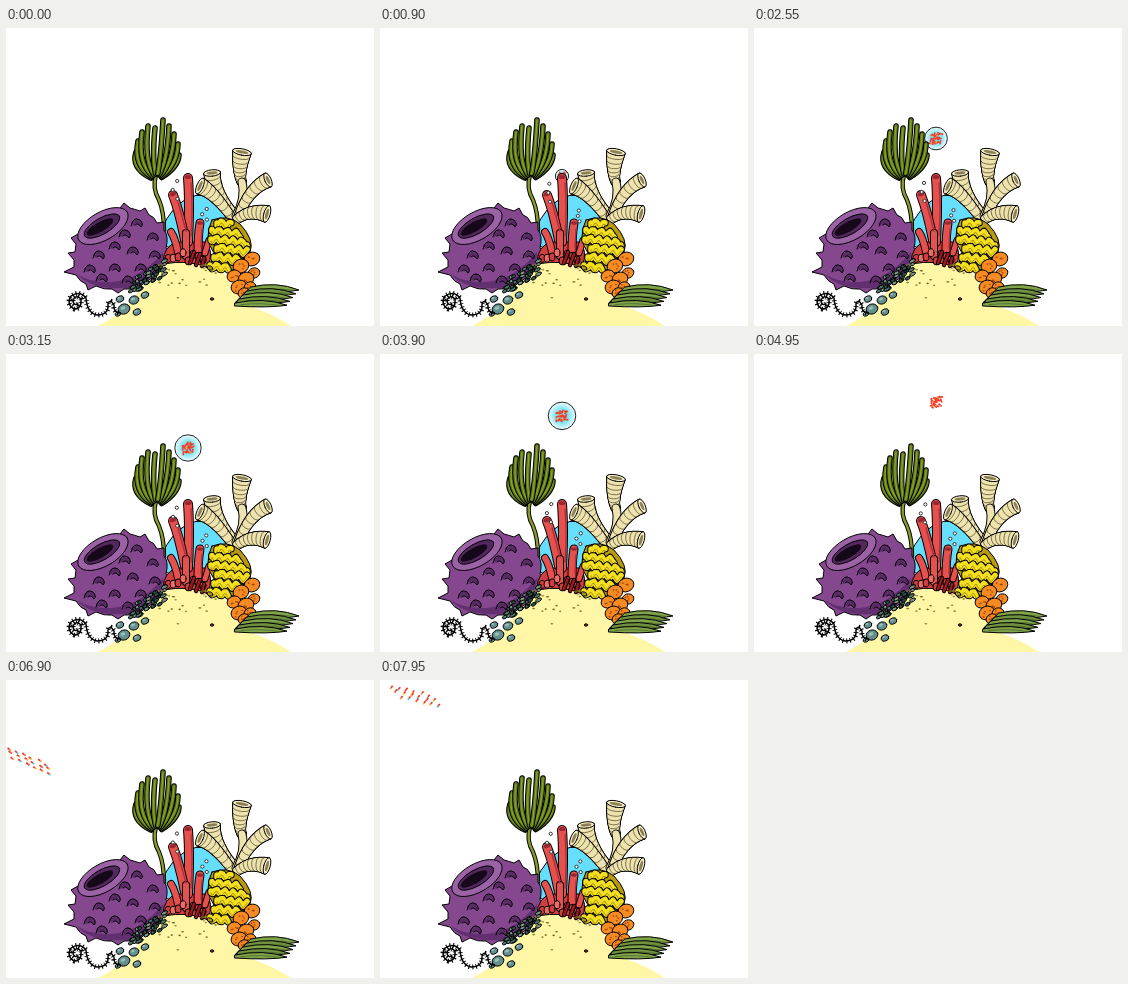
Recreate the animation shown at these times as an HTML page with a canvas. Size 368 by 298 pixels, loop 8000 ms.

```html
<!DOCTYPE html>
<html lang="en">
<head>
<meta charset="utf-8">
<title>Coral reef</title>
<style>
html, body { margin: 0; width: 100%; height: 100%; overflow: hidden; background: #fff; }
canvas { display: block; width: 368px; height: 298px; }
</style>
</head>
<body>
<canvas id="stage" width="368" height="298"></canvas>
<script>
const W = 368, H = 298, LOOP = 8000, STEP = 150, TAU = Math.PI * 2;
const ctx = document.getElementById('stage').getContext('2d');
const reef = document.createElement('canvas');
reef.width = W;
reef.height = H;
const g = reef.getContext('2d');
g.lineCap = g.lineJoin = 'round';

const rand = n => {
  const s = Math.sin(n * 127.1 + 11.7) * 43758.5453;
  return s - Math.floor(s);
};

function shape(d, fill, line = '#000', width = 1) {
  const p = new Path2D(d);
  if (fill) { g.fillStyle = fill; g.fill(p); }
  if (line) { g.strokeStyle = line; g.lineWidth = width; g.stroke(p); }
}

function oval(x, y, rx, ry, turn, fill, line = '#000') {
  g.beginPath();
  g.ellipse(x, y, rx, ry, turn * Math.PI / 180, 0, TAU);
  if (fill) { g.fillStyle = fill; g.fill(); }
  if (line) { g.strokeStyle = line; g.lineWidth = 1; g.stroke(); }
}

// outlined thick stroke
function rope(d, width, color) {
  shape(d, null, '#000', width + 2);
  shape(d, null, color, width);
}

// ribbed tube along a quadratic curve, wide at the mouth
function horn(x0, y0, cx, cy, x1, y1, r0, r1) {
  const at = u => [
    (1 - u) ** 2 * x0 + 2 * u * (1 - u) * cx + u * u * x1,
    (1 - u) ** 2 * y0 + 2 * u * (1 - u) * cy + u * u * y1
  ];
  const radius = u => r1 + (r0 - r1) * (1 - u) ** 1.4;
  const turn = u => Math.atan2((1 - u) * (cy - y0) + u * (y1 - cy), (1 - u) * (cx - x0) + u * (x1 - cx));
  for (const [grow, color] of [[1, '#000'], [0, '#eee3ae']]) {
    g.fillStyle = color;
    for (let u = 0; u <= 1; u += 0.015) {
      const [x, y] = at(u);
      g.beginPath();
      g.ellipse(x, y, 2 + grow, radius(u) + grow, turn(u), 0, TAU);
      g.fill();
    }
  }
  g.strokeStyle = '#5c5230';
  g.lineWidth = 0.8;
  for (let u = 0.13; u < 0.95; u += 0.13) {
    const [x, y] = at(u);
    g.beginPath();
    g.ellipse(x, y, 2, radius(u), turn(u), -Math.PI / 2, Math.PI / 2);
    g.stroke();
  }
  const deg = turn(0) * 180 / Math.PI;
  oval(x0, y0, 3.2, r0 + 0.5, deg, '#f8f0c4');
  oval(x0, y0, 1.5, r0 - 2.5, deg, '#8c8058', null);
}

function sand() {
  shape('M92 298 Q112 288 126 273 Q148 240 170 232 Q195 226 215 240 Q230 262 240 277 Q268 286 285 298Z', '#fff7a6', null);
}

function water() {
  shape('M156 200 Q165 180 180 171 Q200 160 220 179 L226 190 L206 216 L170 222 L154 216Z', '#66dfff');
}

function weed() {
  rope('M150 147 Q146 160 153 172 Q158 184 158 202', 2.4, '#8a9c28');
  const tips = [[130, 124], [173, 127], [132, 113], [172, 116], [136, 104], [168, 106],
    [142, 98], [163, 98], [149, 100], [157, 92]];
  tips.forEach(([x, y], i) => {
    const base = 150 + (x - 150) * 0.25;
    const d = `M${base} ${150 - i * 0.5} Q${x - 3 + (x - 150) * 0.1} ${140 - i} ${x} ${y}`;
    rope(d, 3.6, '#5f7a18');
    shape(d, null, '#8ba628', 1.2);
  });
}

function sponge() {
  shape('M72 206 L65 210 L70 216 L69 224 L62 225 L68 232 L68 239 L58 244 L70 247 Q74 254 80 256 L82 262 L90 258 Q98 262 106 261 L112 265 L118 261 Q130 262 140 254 Q154 246 160 232 L164 226 L160 220 Q163 208 158 202 L158 194 L151 195 Q148 188 143 187 L139 180 L134 183 Q128 181 124 180 L118 175 L114 180Z', '#85488f');
  shape('M71 246 Q84 255 106 254 Q134 252 157 224 Q157 240 140 253 Q128 262 106 260 Q82 259 71 246Z', '#623070', null);
  oval(97, 198, 28, 14, -30, '#9b63a6');
  oval(96, 198, 20, 8, -30, '#54285f');
  oval(94, 199, 15, 5, -30, '#150818', null);
  const bumps = [[108, 217], [130, 194], [126, 222], [92, 226], [146, 208], [108, 239],
    [134, 239], [83, 240], [118, 205], [148, 226], [95, 249], [121, 251]];
  for (const [x, y] of bumps) {
    shape(`M${x - 5} ${y + 4} Q${x - 3} ${y - 6} ${x + 4} ${y - 2} Q${x + 8} ${y + 2} ${x + 5} ${y + 5} Q${x + 2} ${y} ${x - 1} ${y + 3}`, '#5b2b68');
  }
}

function trumpets() {
  horn(206, 145, 208, 165, 230, 188, 8, 4);
  horn(194, 158, 208, 164, 226, 190, 8, 4);
  horn(236, 124, 232, 145, 236, 155, 9, 4);
  rope('M236 154 Q240 170 230 188', 7, '#eee3ae');
  horn(262, 152, 242, 161, 232, 190, 7, 4);
  horn(261, 186, 243, 181, 230, 192, 8, 4);
}

function redCoral() {
  const red = '#e4514f';
  shape('M157 233 Q158 219 170 214 L200 214 Q208 222 202 240 Q184 231 157 236Z', '#cf3f40');
  rope('M182 150 Q184 175 182 214', 8, red);
  rope('M167 167 Q173 182 179 212', 8, red);
  rope('M194 195 Q192 207 192 223', 7, red);
  rope('M165 204 Q169 210 172 224', 6, red);
  rope('M203 212 L199 225', 5, red);
  rope('M180 205 L180 228', 6, red);
  oval(182, 149, 3.5, 2, 0, '#9c2530', null);
  oval(167, 166, 3.5, 2, -20, '#9c2530', null);
  oval(194, 195, 3, 1.8, 0, '#9c2530', null);
  shape('M185 155 Q187 178 185 208 M172 174 L180 203 M196 201 L195 219', null, '#ae2e36', 1.3);
  for (let i = 0; i < 8; i++) oval(162 + i * 5, 224 + rand(i) * 9, 3, 4, 0, i % 2 ? '#f06b66' : '#cf3f40');
  rope('M184 235 L188 224 M190 237 L194 226 M196 238 L198 230', 2.4, '#a3161e');
}

function ruffles() {
  shape('M206 192 Q222 186 234 196 Q249 212 244 224 L228 242 L203 242 L208 225 Q197 210 206 192Z', '#b89a10');
  const rows = [[211, 195, 226], [206, 203, 235], [205, 211, 241], [211, 220, 242], [208, 229, 236], [204, 238, 223]];
  rows.forEach(([x0, y, x1], k) => {
    let d = `M${x0} ${y}`;
    for (let x = x0; x <= x1; x += 2) d += `L${x} ${y + (x - x0) * 0.13 + Math.sin(x * 0.75 + k * 2) * 2.6}`;
    rope(d, 5.5, '#f3df20');
    g.save();
    g.translate(0, 1.8);
    shape(d, null, '#aa9612', 1);
    g.restore();
  });
}

function orangeCoral() {
  const lumps = [[246, 231, 8], [235, 238, 8], [248, 245, 6], [228, 248, 7], [240, 251, 8],
    [233, 259, 8], [244, 259, 6], [238, 265, 6]];
  lumps.forEach(([x, y, r], i) => {
    oval(x, y, r, r * 0.85, -20, '#f58b22');
    for (let k = 0; k < 4; k++) {
      oval(x + (rand(i * 9 + k) - 0.5) * r, y + (rand(i * 5 + k + 70) - 0.5) * r, 1, 0.8, 0, '#a9480c', null);
    }
  });
}

function plates() {
  for (let k = 0; k < 5; k++) {
    const x = 293 - k * 3, y = 262 + k * 3.8;
    shape(`M${245 - k * 4} ${259 + k * 4} Q${270 - k * 3} ${253 + k * 4} ${x} ${y} Q${270 - k * 2} ${265 + k * 3.8} ${230 - k * 0.3} ${274 + k}Z`, k % 2 ? '#6f9140' : '#81a34a');
    shape(`M${247 - k * 3} ${263 + k * 3.4} Q${268 - k * 3} ${259 + k * 3.8} ${x - 7} ${y + 0.5}`, null, '#4b692a', 0.8);
  }
}

function rubble() {
  for (let i = 0; i < 42; i++) {
    const u = rand(i);
    oval(122 + u * 37, 263 - u * 24 + (rand(i + 50) - 0.5) * 17, 1.6 + rand(i + 90) * 2, 1.6, -30,
      ['#4f766b', '#315249', '#7b9a86'][i % 3]);
  }
  [[118, 281, 6, 5], [128, 272, 5, 4], [114, 271, 4, 3], [139, 267, 4, 3], [131, 284, 4, 3], [112, 286, 3, 2]]
    .forEach(([x, y, rx, ry]) => {
      oval(x, y, rx, ry, -20, '#648f8c');
      oval(x - 1, y - 1, rx * 0.4, ry * 0.3, -20, '#9bc0b9', null);
    });
  for (let i = 0; i < 24; i++) {
    oval(148 + rand(i + 200) * 62, 237 + rand(i + 240) ** 2 * 34, 0.8 + rand(i + 280), 0.8, 0,
      i % 3 ? '#8c8434' : '#5f6820', null);
  }
  oval(206, 271, 1.7, 1.2, 0, '#80501c');
  oval(204, 240, 3, 2, 20, '#a99a26');
}

function worm() {
  const d = 'M72 276 Q67 278 67 272 Q70 266 75 271 Q76 281 68 281 Q60 276 65 268 Q74 262 80 270 Q81 285 91 287 Q103 287 102 276 Q104 270 108 277 Q107 284 114 285';
  shape(d, null, '#000', 1.5);
  g.save();
  g.lineCap = 'butt';
  g.setLineDash([1, 2.5]);
  shape(d, null, '#000', 5);
  g.restore();
}

[sand, water, weed, sponge, trumpets, redCoral, ruffles, orangeCoral, plates, rubble, worm].forEach(draw => draw());

// values between rows of [time, ...values]
function tween(rows, t) {
  if (t <= rows[0][0]) return rows[0].slice(1);
  for (let i = 1; i < rows.length; i++) {
    const a = rows[i - 1], b = rows[i];
    if (t <= b[0]) {
      const u = (t - a[0]) / (b[0] - a[0]);
      return a.slice(1).map((v, k) => v + (b[k + 1] - v) * u);
    }
  }
  return rows[rows.length - 1].slice(1);
}

// time, y, radius
const rise = [[450, 157, 4], [1050, 145, 7.5], [1950, 127, 9.5], [3150, 94, 13.2], [4200, 49, 14], [4350, 48, 14]];
// time, centre, column vector, row vector, heading
const swim = [
  [4950, 182, 48, 1.7, -0.3, -0.5, 3.6, 140],
  [5250, 172, 54, 3.6, -1.6, -2, 5, 140],
  [5850, 103, 84, 7.6, -3.6, -5, 9, 142],
  [6300, 56, 89, 7.6, -0.6, -2, 7, 175],
  [6900, 23, 81, 7.5, 3.2, 1.5, 4.5, 218],
  [7350, 21, 37, 7.4, 2.6, 3, 5, 265],
  [7950, 35, 16, 7.6, 1.8, 5, 5, 308]
];
const tails = ['#ff9a30', '#45cfe0', '#ff4030', '#e8cc30'];

function ring(x, y, r, fill, line) {
  ctx.beginPath();
  ctx.arc(x, y, r, 0, TAU);
  ctx.fillStyle = fill;
  ctx.fill();
  ctx.strokeStyle = line;
  ctx.lineWidth = 1;
  ctx.stroke();
}

function bigBubble(t) {
  const [y, r] = tween(rise, t);
  const glow = ctx.createRadialGradient(182, y, 0, 182, y, r);
  glow.addColorStop(0, '#62def0');
  glow.addColorStop(0.55, '#8ae8f5');
  glow.addColorStop(1, '#f2fdff');
  ring(182, y, r, glow, '#222');
}

function burst(t) {
  const r = 17 + (t - 4500) / 300 * 7;
  ctx.strokeStyle = '#62cfe2';
  ctx.lineWidth = 1;
  for (let i = 0; i < 14; i++) {
    const a = i / 14 * TAU;
    ctx.beginPath();
    ctx.moveTo(186 + r * Math.cos(a), 46 + r * Math.sin(a));
    ctx.lineTo(186 + (r + 4) * Math.cos(a), 46 + (r + 4) * Math.sin(a));
    ctx.stroke();
  }
}

function school(t) {
  let [cx, cy, ux, uy, vx, vy, heading] = tween(swim, t);
  const tight = t < 5100, tick = t / STEP;
  let size = 1;
  if (t < 4350) {
    const [y, r] = tween(rise, t);
    cy = y;
    size = Math.min(1, r / 9);
  }
  for (let i = 0; i < 18; i++) {
    const col = i % 6 - 2.5, row = Math.floor(i / 6) - 1;
    const seed = tight ? i + tick * 31 : i;
    const x = cx + size * (col * ux + row * vx + (rand(seed) - 0.5) * 2);
    const y = cy + size * (col * uy + row * vy + (rand(seed + 400) - 0.5) * 2);
    const a = tight ? rand(seed + 800) * TAU : heading * Math.PI / 180;
    const dx = Math.cos(a) * 2 * size, dy = Math.sin(a) * 2 * size;
    const part = (u0, u1, color) => {
      ctx.strokeStyle = color;
      ctx.beginPath();
      ctx.moveTo(x + dx * u0, y + dy * u0);
      ctx.lineTo(x + dx * u1, y + dy * u1);
      ctx.stroke();
    };
    ctx.lineWidth = 1.7 * size;
    part(-0.3, 1, '#f23a28');
    part(-1.1, -0.3, tight && i % 4 ? '#f23a28' : tails[i % 4]);
  }
}

function stream(t, x, low, high, period, sway) {
  for (let i = 0; i < 3; i++) {
    const u = (t / period + i / 3 + 0.15) % 1;
    ring(x + Math.sin(u * 9) * sway, low + (high - low) * u, 1.6, '#fff', '#333');
  }
}

function paint(t) {
  ctx.clearRect(0, 0, W, H);
  if (t >= 450) {
    if (t < 4500) bigBubble(t);
    else if (t < 4900) burst(t);
    school(t);
  }
  ctx.drawImage(reef, 0, 0);
  stream(t, 169, 175, 148, 1600, 2.5);
  stream(t, 198.5, 194, 178, 1600, 2.5);
}

function tick(now) {
  paint(Math.floor(now % LOOP / STEP) * STEP);
  requestAnimationFrame(tick);
}
paint(0);
requestAnimationFrame(tick);
</script>
</body>
</html>
```
